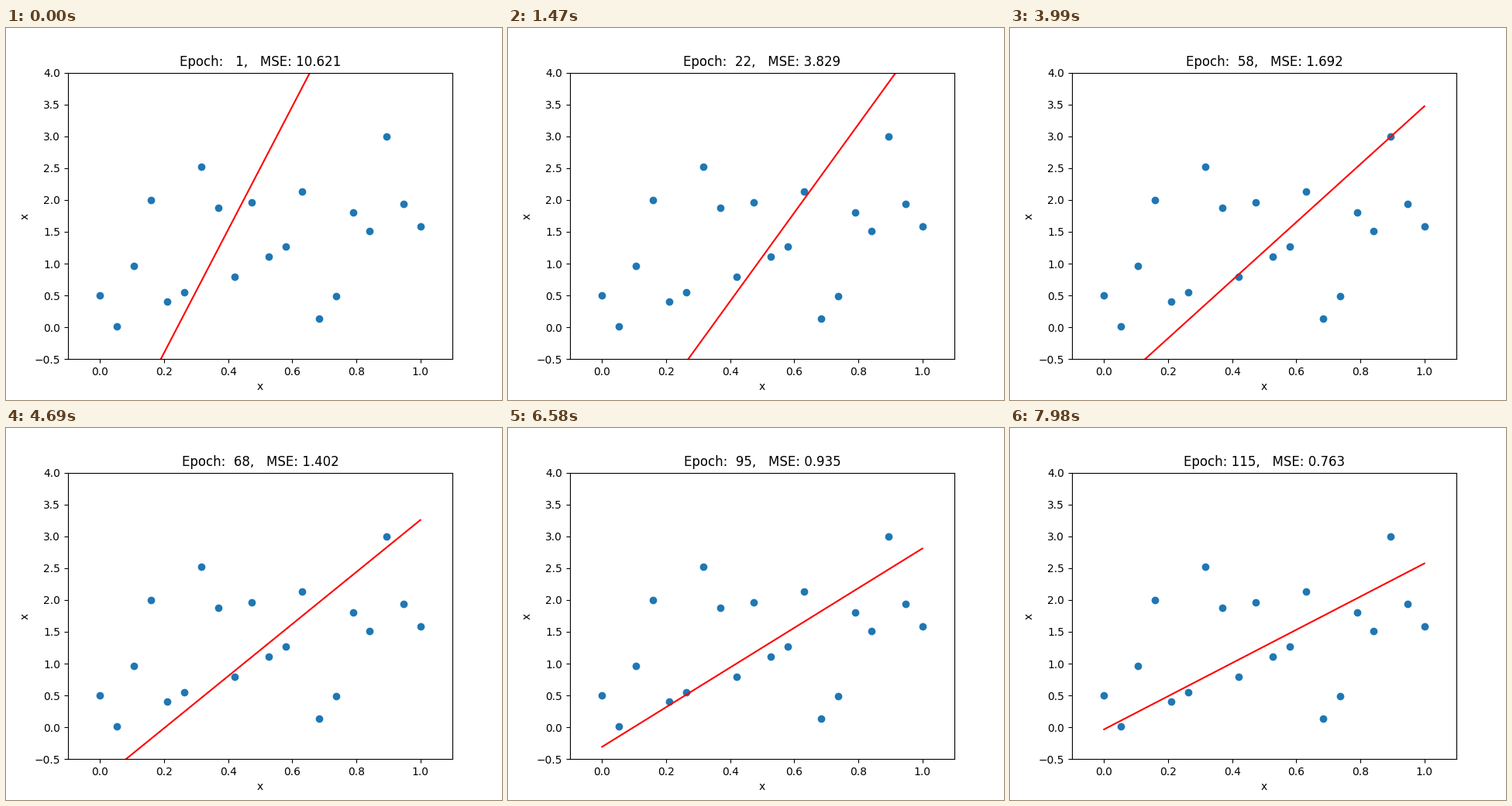
Animation, 640 px wide and 480 px high, one loop 8 s. Source, as a matplotlib script:

```python
import numpy as np
import matplotlib.pyplot as plt
from matplotlib.animation import FuncAnimation

LOOP_MS = 8000
TICK_MS = 20
EPOCH_MS = 70
EPOCHS = 115
RATE = 0.1

np.random.seed(42)
x = np.linspace(0, 1, 20)
y = 3 * x + np.random.randn(20)


def train(w, b):
    """Gradient descent; each entry is the error before a step and the line after it."""
    history = []
    for _ in range(EPOCHS):
        err = w * x + b - y
        w -= RATE * 2 * np.mean(err * x)
        b -= RATE * 2 * np.mean(err)
        history.append((np.mean(err ** 2), w, b))
    return history


history = train(10.0, -2.0)

fig, ax = plt.subplots(figsize=(6.4, 4.8), dpi=100)
ax.scatter(x, y)
line, = ax.plot(x, x, "r-")
ax.set(xlim=(-0.1, 1.1), ylim=(-0.5, 4), xlabel="x", ylabel="x")
title = ax.set_title("")


def update(tick):
    # sample mid-tick so that epoch changes fall on the nearest tick
    i = min(int((tick + 0.5) * TICK_MS) // EPOCH_MS, EPOCHS - 1)
    mse, w, b = history[i]
    line.set_ydata(w * x + b)
    title.set_text(f"Epoch: {i + 1:3d},   MSE: {mse:.3f}")
    return line, title


anim = FuncAnimation(fig, update, frames=LOOP_MS // TICK_MS, interval=TICK_MS,
                     repeat=True, repeat_delay=0)
plt.show()
```
